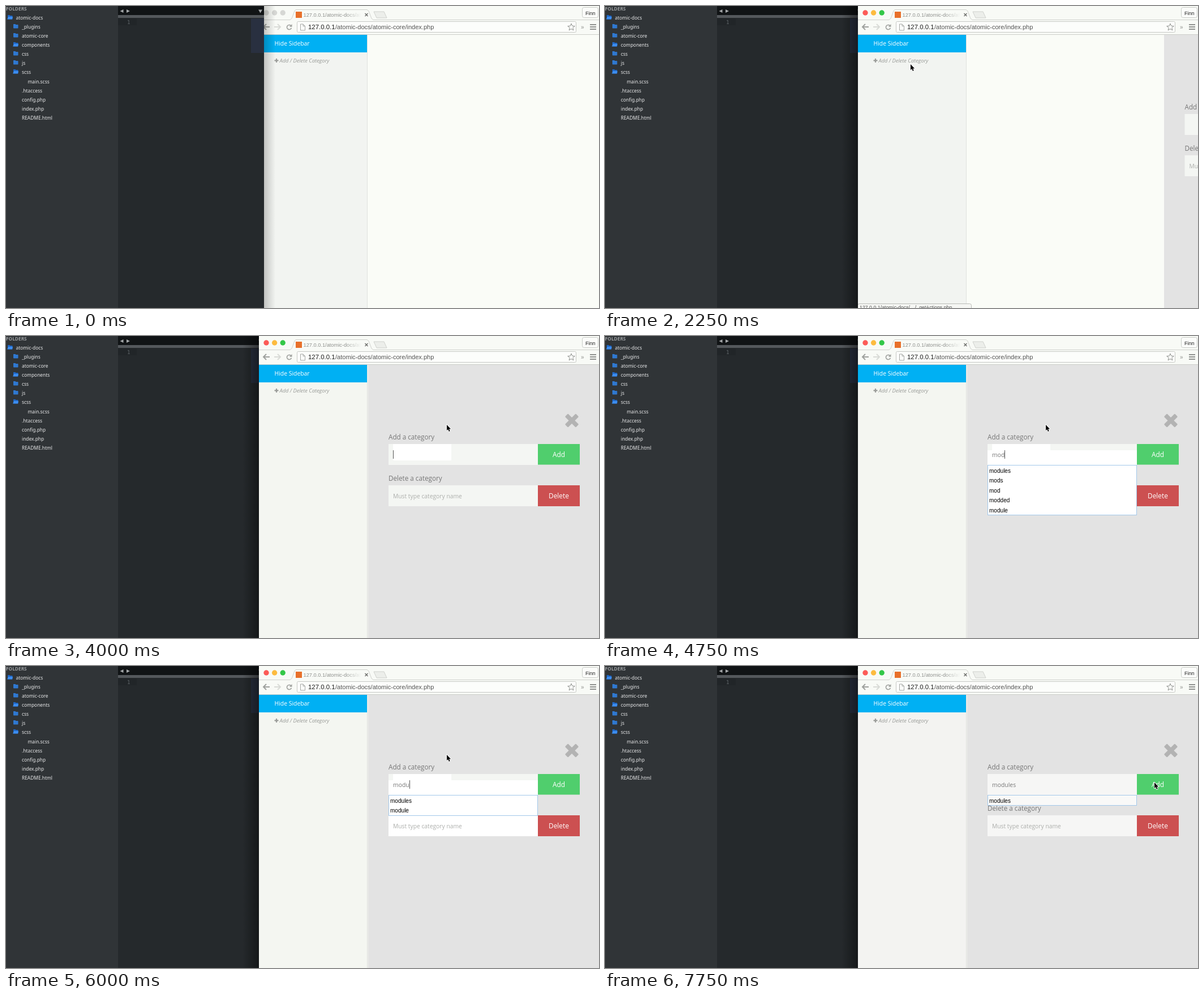
Write an HTML page with a canvas that moves like this. It is 1048 by 534 pixels and loops after 8 s.

```html
<!DOCTYPE html>
<html lang="en">
<head>
<meta charset="utf-8">
<title>Adding a category</title>
<style>
html, body { margin: 0; width: 100%; height: 100%; overflow: hidden; background: #fafcf7; }
canvas { display: block; width: 1048px; height: 534px; }
</style>
</head>
<body>
<canvas id="stage" width="1048" height="534"></canvas>
<script>
const ctx = document.getElementById('stage').getContext('2d', { alpha: false });
const W = 1048, H = 534, LOOP = 8000;
const OPEN = '"Open Sans", sans-serif';
const NOTO = '"Noto Sans", sans-serif';
const ARIAL = '"Liberation Sans", Arial, sans-serif';
const MONO = '"DejaVu Sans Mono", monospace';

// Steps are [start time, ...value]; the last one reached is in force.
const CURSOR = [
  [0, null], [750, 556.5, 76.5], [1000, 542.5, 99], [1250, 540, 103],
  [2750, 677, 105.5], [3000, 737, 181], [3250, 738, 212, 'beam'],
  [4000, 779, 157], [7250, 820, 155.5], [7500, 971, 167], [7750, 971, 206]
];
const TYPED = [
  [0, ''], [4500, 'mo'], [4750, 'mod'], [5000, 'modul'],
  [6000, 'modu'], [6750, 'module'], [7000, 'modules']
];
const CARET = [
  [0, false], [3250, true], [3500, false], [4000, true], [5500, false],
  [6000, true], [6500, false], [6750, true], [7500, false]
];
const SUGGESTIONS = ['modules', 'mods', 'mod', 'modded', 'module', 'moments'];
const TREE = [
  ['atomic-docs', 0, 'open'], ['_plugins', 1, 'shut'], ['atomic-core', 1, 'shut'],
  ['components', 1, 'open'], ['css', 1, 'shut'], ['js', 1, 'shut'], ['scss', 1, 'open'],
  ['main.scss', 2], ['.htaccess', 1], ['config.php', 1], ['index.php', 1], ['README.html', 1]
];

const at = (steps, t) => steps.filter(s => s[0] <= t).pop().slice(1);

function rect(x, y, w, h, color) {
  ctx.fillStyle = color;
  ctx.fillRect(x, y, w, h);
}
function text(str, x, y, size, family, color, style = '') {
  ctx.font = `${style} ${size}px ${family}`;
  ctx.fillStyle = color;
  ctx.fillText(str, x, y);
}
function path(points, closed) {
  ctx.beginPath();
  points.forEach(([x, y]) => ctx.lineTo(x, y));
  if (closed) ctx.closePath();
}
function poly(points, color) {
  path(points, true);
  ctx.fillStyle = color;
  ctx.fill();
}
function line(points, color, width = 1, closed = false) {
  path(points, closed);
  ctx.strokeStyle = color;
  ctx.lineWidth = width;
  ctx.stroke();
}
function round(x, y, w, h, r, fill, stroke) {
  ctx.beginPath();
  ctx.roundRect(x, y, w, h, r);
  if (fill) { ctx.fillStyle = fill; ctx.fill(); }
  if (stroke) { ctx.strokeStyle = stroke; ctx.lineWidth = 1; ctx.stroke(); }
}
function disc(x, y, r, color) {
  ctx.beginPath();
  ctx.arc(x, y, r, 0, 7);
  ctx.fillStyle = color;
  ctx.fill();
}
function fade(x0, x1, y, h, from, to) {
  const g = ctx.createLinearGradient(x0, 0, x1, 0);
  g.addColorStop(0, from);
  g.addColorStop(1, to);
  rect(x0, y, x1 - x0, h, g);
}

function folder(x, y, isOpen) {
  const back = isOpen ? '#1f66c4' : '#2f78d0';
  rect(x + 1, y, 4, 2, back);
  round(x + 1, y + 1, 8.5, 6.5, 0.8, back);
  if (isOpen) {
    poly([[x + 2, y + 3], [x + 10, y + 3], [x + 9, y + 7.6], [x, y + 7.6]], '#3d8df0');
  }
}

function drawEditor() {
  rect(0, 0, 198, H, '#303437');
  text('FOLDERS', 0, 8, 8.3, NOTO, '#9a9da0', 'bold');
  TREE.forEach(([name, depth, kind], i) => {
    const y = 24 + 16.08 * i;
    if (kind) folder(2 + 10 * depth, Math.round(y) - 8, kind === 'open');
    text(name, [17.5, 28, 38.5][depth], y, 8.4, NOTO, '#e8e9ea');
  });

  rect(198, 0, 258, H, '#25292c');
  rect(198, 0, 258, 16, '#111416');
  rect(198, 16, 258, 5, '#54585c');
  poly([[201.5, 9], [207.5, 6], [207.5, 12]], '#a3a6a8');
  poly([[219, 9], [213, 6], [213, 12]], '#a3a6a8');
  poly([[446, 6.5], [453, 6.5], [449.5, 12.5]], '#a3a6a8');
  rect(198, 22, 33, 12, '#212528');
  text('1', 214, 31.5, 9.3, MONO, '#60666a');
  rect(433, 22, 23, 61, '#293040');
}

function drawChrome(active) {
  const bar = '#f8faf6';
  rect(447, 0, 601, 51, bar);
  const lights = active ? ['#fc5b57', '#fdbb3f', '#33c748'] : Array(3).fill('#d6d7d4');
  lights.forEach((c, i) => disc(460 + 14.6 * i, 12, 4.7, c));

  line([[447, 24.5], [502, 24.5], [505, 22], [510, 9], [512, 6.5], [638, 6.5],
    [641, 9], [646, 22], [649, 24.5], [W, 24.5]], '#cfd1cd');
  const skew = [[650, 10], [668, 10], [673, 21], [655, 21]];
  poly(skew, '#eceeea');
  line(skew, '#cfd1cd', 1, true);
  rect(512, 10, 11, 11, '#e8702a');
  ctx.save();
  ctx.beginPath();
  ctx.rect(525, 7, 102, 16);
  ctx.clip();
  text('127.0.0.1/atomic-docs/ato', 525.5, 18.5, 9.25, ARIAL, '#8f918e');
  ctx.restore();
  fade(600, 628, 9, 12, 'rgba(248,250,246,0)', bar);
  line([[634.5, 13], [639.5, 18]], '#6d6f6c', 1.5);
  line([[639.5, 13], [634.5, 18]], '#6d6f6c', 1.5);
  round(1018.5, 2.5, 28, 18, 3, '#fbfcfa', '#c9cbc7');
  text('Finn', 1024, 15.5, 9, ARIAL, '#222');

  const back = '#9fa19e', dim = '#d9dbd7';
  line([[466, 37], [455, 37]], back, 2);
  line([[460, 32], [455, 37], [460, 42]], back, 2);
  line([[474, 37], [485, 37]], dim, 2);
  line([[480, 32], [485, 37], [480, 42]], dim, 2);
  ctx.beginPath();
  ctx.arc(500.5, 37.5, 4, 0.3, 5.5);
  ctx.strokeStyle = back;
  ctx.lineWidth = 1.7;
  ctx.stroke();
  poly([[505.5, 32], [505.5, 36.8], [500.8, 36.8]], back);

  round(514.5, 27.5, 493, 19, 2, '#fcfdfb', '#c6c8c4');
  line([[520.5, 32], [525, 32], [528.5, 35.5], [528.5, 43], [520.5, 43]], '#a5a7a4', 1, true);
  line([[525, 32], [525, 35.5], [528.5, 35.5]], '#a5a7a4');
  text('127.0.0.1', 534, 41, 11.4, ARIAL, '#1c1c1c');
  text('/atomic-docs/atomic-core/index.php', 582, 41, 11.05, ARIAL, '#555');
  const star = Array.from({ length: 10 }, (_, i) => {
    const r = i % 2 ? 2.9 : 6.6, a = i * Math.PI / 5 - Math.PI / 2;
    return [999 + r * Math.cos(a), 37.6 + r * Math.sin(a)];
  });
  line(star, '#8f918e', 1, true);
  text('»', 1016, 40.5, 10, ARIAL, '#8f918e');
  [33, 37, 41].forEach(y => rect(1032, y - 1, 11, 2, '#8f918e'));
  rect(447, 50, 601, 1, '#cccec9');
}

function drawSidebar(t) {
  rect(447, 51, 191, H - 51, t < 2500 ? '#f2f4f1' : t < 7500 ? '#f4f6f1' : '#f3f3f1');
  rect(447, 51, 191, 31, '#00b0f3');
  rect(638, 51, 1, H - 51, '#e0e2de');
  text('Hide Sidebar', 474.5, 70, 10.4, OPEN, '#fff');
  rect(474.5, 95.3, 7, 2.2, '#999b98');
  rect(476.9, 92.9, 2.2, 7, '#999b98');
  text('Add / Delete Category', 483.5, 99.8, 9.3, OPEN, '#999b98', 'italic');
  if (t >= 2250 && t < 3000) {
    round(446.5, 526.5, 201, 12, 3, '#f5f6f3', '#b9bbb7');
    text('127.0.0.1/atomic-docs/…/_getActions.php', 450, 536, 8.8, ARIAL, '#555');
  }
}

function drawInput(t) {
  const late = t >= 7500, fill = late ? '#f6f6f5' : '#f4f6f3';
  rect(676, 191, 264, 37, fill);
  if (t >= 4000 && !late) {
    rect(684, 191, 103, t < 4500 ? 29 : 12, '#fff');
    if (t >= 4500) rect(676, 202, 264, 26, '#fff');
  }
  rect(676, 264, 264, 37, t >= 5000 && !late ? '#fff' : fill);
}

function drawSuggestions(typed, t) {
  const items = SUGGESTIONS.filter(s => s.startsWith(typed));
  const height = 1.5 + 17.5 * items.length;
  rect(676, 228, 264, height, t < 7500 ? '#fff' : '#f9f9f8');
  ctx.strokeStyle = '#a3c8ea';
  ctx.lineWidth = 1;
  ctx.strokeRect(676.5, 228.5, 263, Math.round(height) - 1);
  items.forEach((s, i) => text(s, 679, 241.5 + 17.5 * i, 10.05, ARIAL, '#000'));
}

function drawPanel(t) {
  ctx.save();
  if (t < 2500) ctx.translate(348.5, 0);
  rect(639.5, 51, 409, H - 51, '#e3e3e3');

  ctx.save();
  ctx.translate(1000, 149.5);
  ctx.rotate(Math.PI / 4);
  round(-13.5, -3.8, 27, 7.6, 1.4, '#b3b3b3');
  round(-3.8, -13.5, 7.6, 27, 1.4, '#b3b3b3');
  ctx.restore();

  text('Add a category', 676, 182.5, 11.7, OPEN, '#777');
  text('Delete a category', 676, 256, 11.7, OPEN, '#777');
  drawInput(t);
  text('Must type category name', 684, 286.5, 10.3, OPEN, '#acaeab');
  rect(940, 191, 74, 36.5, '#50ce6d');
  rect(940, 264, 74, 37, '#cc5051');
  text('Add', 966, 213.5, 11.8, OPEN, '#fff');
  text('Delete', 959, 287, 11.9, OPEN, '#fff');

  const [typed] = at(TYPED, t);
  text(typed, 684, 213.5, 10.4, OPEN, '#777');
  if (at(CARET, t)[0]) {
    rect(Math.round(684 + ctx.measureText(typed).width), 202, 1, 15, '#555');
  }
  if (typed) drawSuggestions(typed, t);
  ctx.restore();
}

function drawCursor(t) {
  const [x, y, shape] = at(CURSOR, t);
  if (x === null) return;
  ctx.save();
  ctx.translate(x, y);
  if (shape === 'beam') {
    line([[0, -7], [0, 7]], '#333');
    line([[-2.5, -7.5], [0, -6.5], [2.5, -7.5]], '#333');
    line([[-2.5, 7.5], [0, 6.5], [2.5, 7.5]], '#333');
  } else {
    const arrow = [[0, 0], [0, 10.2], [2.3, 8.1], [3.9, 11.9], [5.7, 11.1], [4.1, 7.4], [7.2, 7.4]];
    ctx.lineJoin = 'round';
    line(arrow, '#fff', 1.8, true);
    poly(arrow, '#000');
  }
  ctx.restore();
}

function draw(t) {
  const active = t >= 1500;
  rect(0, 0, W, H, '#fafcf7');
  drawEditor();
  ctx.save();
  ctx.beginPath();
  ctx.rect(active ? 447 : 456, 0, W, H);
  ctx.clip();
  rect(447, 0, 601, H, '#fafcf7');
  drawChrome(active);
  drawSidebar(t);
  if (t >= 2250) drawPanel(t);
  ctx.restore();
  if (active) fade(418, 447, 0, H, 'rgba(0,0,0,0)', 'rgba(0,0,0,.42)');
  else fade(456, 476, 0, H, 'rgba(0,0,0,.2)', 'rgba(0,0,0,0)');
  drawCursor(t);
}

function tick() {
  draw(performance.now() % LOOP);
  requestAnimationFrame(tick);
}
tick();
</script>
</body>
</html>
```
